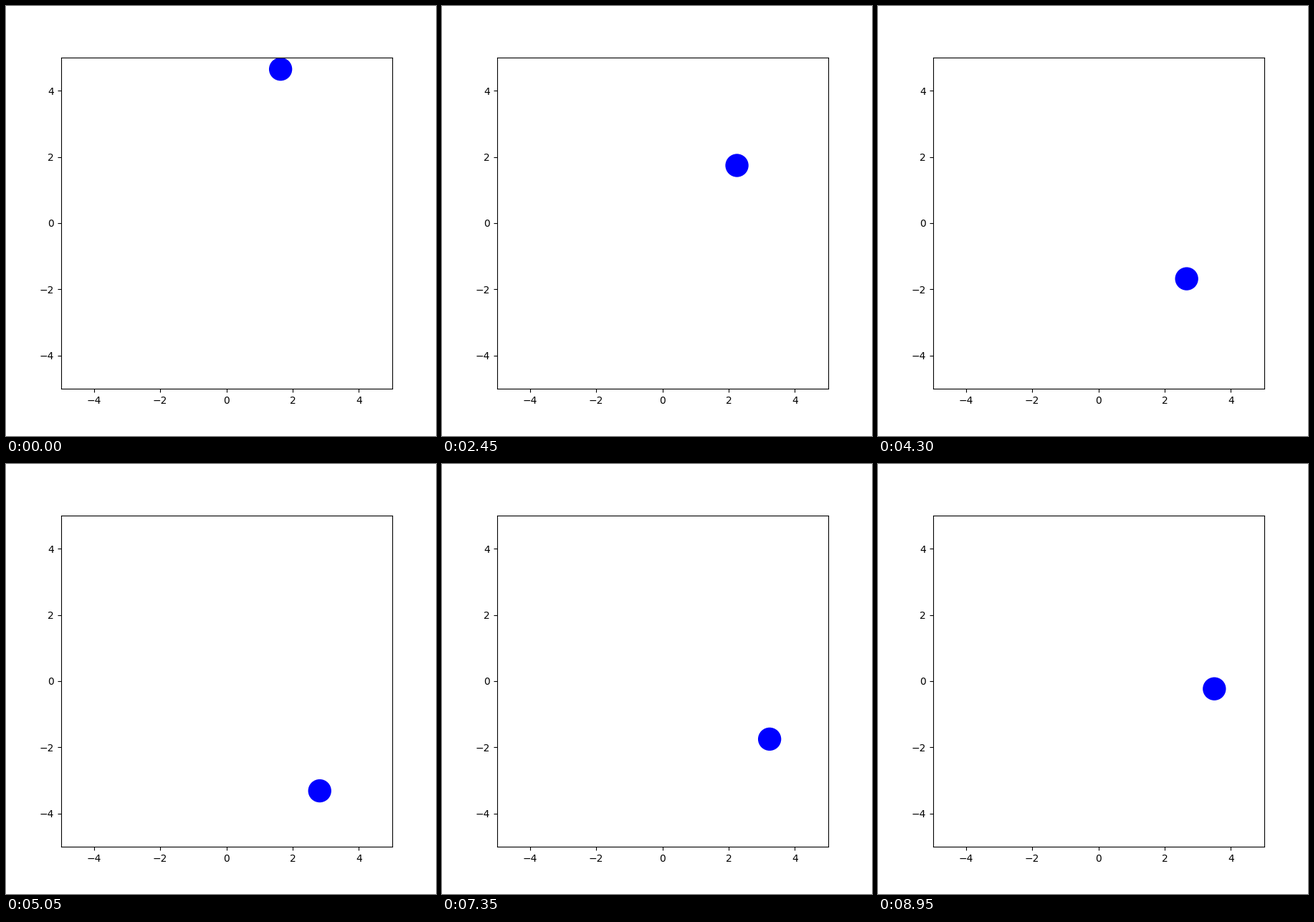
A matplotlib script for the animation above (9 s loop, 600 px wide and 600 px high).

```python
import numpy as np
import matplotlib.pyplot as plt
from matplotlib.animation import FuncAnimation
from matplotlib.patches import Circle

FRAMES = 180
INTERVAL = 50
LIMIT = 5
RADIUS = 0.35
DT = 0.01
GRAVITY = np.array([0, -9.8])
DRAG = 0.0351
BOUNCE = 0.9


def simulate():
    """Fall with quadratic air drag and a lossy bounce on the floor."""
    pos = np.array([1.637, LIMIT - RADIUS])
    vel = np.array([1.314, -3.78])
    floor = RADIUS - LIMIT
    path = [pos]
    for _ in range(FRAMES - 1):
        acc = GRAVITY - DRAG * np.hypot(*vel) * vel
        pos = pos + vel * DT + acc * DT**2 / 2
        vel = vel + acc * DT
        if pos[1] < floor:
            pos[1] = floor
            vel[1] *= -BOUNCE
        path.append(pos)
    return path


path = simulate()

fig, ax = plt.subplots(figsize=(6, 6), dpi=100)
ax.set_xlim(-LIMIT, LIMIT)
ax.set_ylim(-LIMIT, LIMIT)
ax.set_aspect("equal")
ball = ax.add_patch(Circle(path[0], RADIUS, facecolor="blue", linewidth=0))


def update(i):
    ball.center = path[i]
    return (ball,)


anim = FuncAnimation(fig, update, frames=FRAMES, interval=INTERVAL,
                     repeat=True, repeat_delay=0)
plt.show()
```
